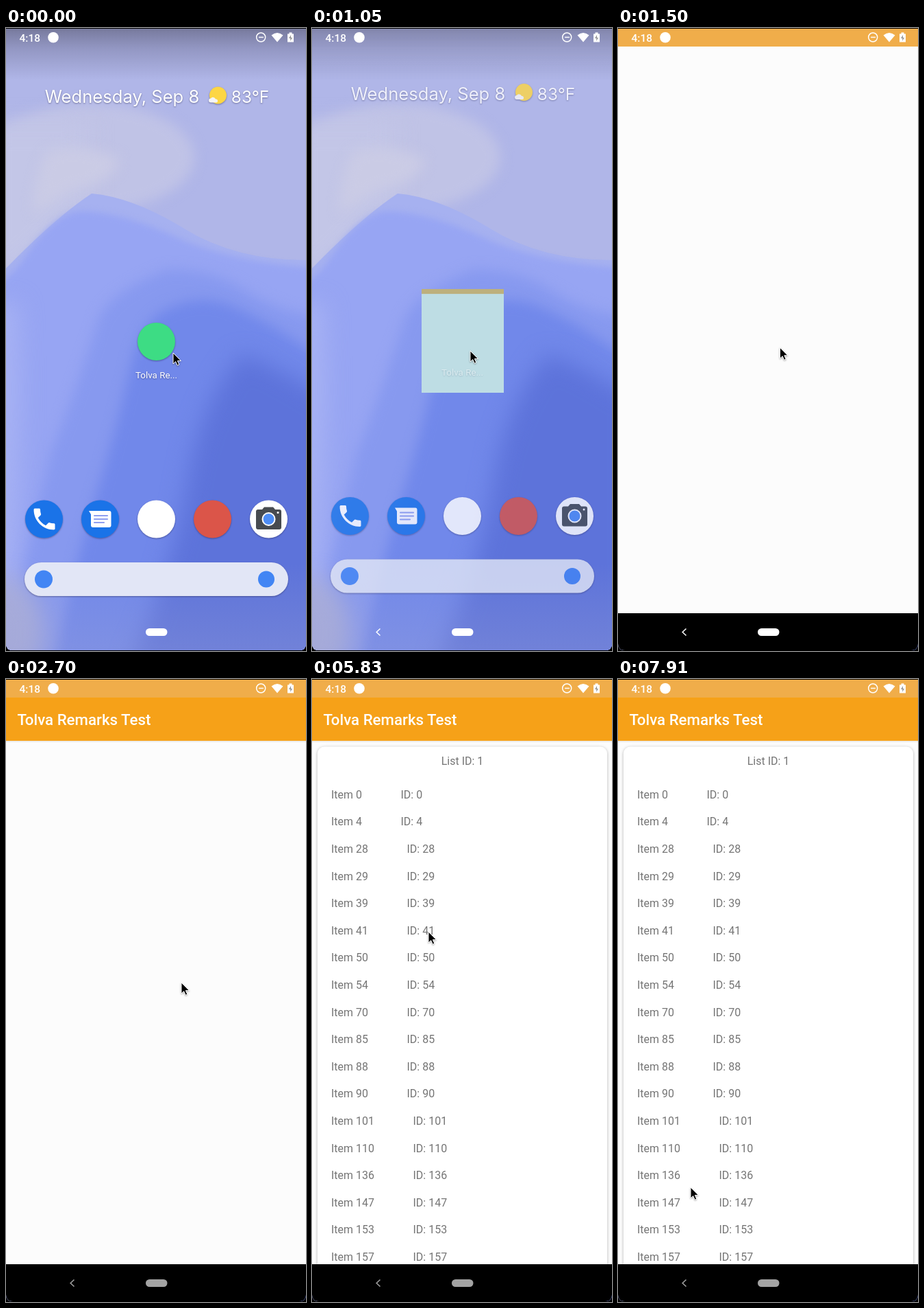
Recreate the animation shown at these times as an HTML page. Size 438 by 907 pixels, loop 8 s.

```html
<!DOCTYPE html>
<html lang="en">
<head>
<meta charset="utf-8">
<style>
html, body { margin: 0; height: 100%; overflow: hidden; background: #000; }
svg { display: block; width: 438px; height: 907px; font-family: Roboto, sans-serif; }
.date { font: 400 25.6px Inter, sans-serif; text-anchor: middle; }
.shade { filter: drop-shadow(0 1px 1px rgba(30, 30, 70, .45)); }
.soft { filter: blur(5px); }
.mist { filter: blur(9px); }
.haze { filter: blur(16px); }
#rows { font-size: 16px; fill: #757575; }
#card { fill: #fff; filter: drop-shadow(0 1px 2px rgba(0, 0, 0, .3)); }
#cursor { filter: drop-shadow(0 1px 1px rgba(0, 0, 0, .35)); }
</style>
</head>
<body>
<svg viewBox="0 0 438 907">
  <defs>
    <clipPath id="screen"><path d="M0 1H438V896Q438 906 428 906H10Q0 906 0 896Z"/></clipPath>
    <clipPath id="content"><rect y="90" width="438" height="762"/></clipPath>
    <linearGradient id="dim" x2="0" y2="1">
      <stop stop-color="#46465c" stop-opacity=".55"/>
      <stop offset=".4" stop-color="#50506e" stop-opacity=".3"/>
      <stop offset="1" stop-color="#50506e" stop-opacity="0"/>
    </linearGradient>
    <linearGradient id="glow" x2="0" y2="1">
      <stop stop-color="#a0a4d4" stop-opacity="0"/>
      <stop offset="1" stop-color="#a0a4d4" stop-opacity=".3"/>
    </linearGradient>
  </defs>
  <rect width="438" height="907"/>
  <g clip-path="url(#screen)">
    <g id="wallpaper">
      <rect width="438" height="907" fill="#b0b6e8"/>
      <ellipse class="mist" cx="125" cy="188" rx="150" ry="78" fill="#c0c3e6"/>
      <path class="haze" d="M-30 140H120V260L-30 400Z" fill="#c3c6e7"/>
      <path class="mist" d="M60 180Q110 165 165 190Q160 225 100 235L40 270Q40 220 60 180Z" fill="#cacbe5"/>
      <path d="M0 350Q72 276 125 241Q185 246 260 292T438 338V907H0Z" fill="#a6b1f0"/>
      <path class="soft" d="M-20 385L20 345Q70 268 110 267Q170 268 250 305T460 350V930H-20Z" fill="#97a5f3"/>
      <path class="haze" d="M-30 400H18Q30 600 0 930H-30Z" fill="#a6b1f3"/>
      <path class="mist" d="M0 930Q35 740 65 620Q105 520 135 425Q150 385 235 352Q300 350 350 382T460 420V930Z" fill="#8799ef"/>
      <path class="mist" d="M70 930Q95 800 130 685Q160 590 180 500Q195 430 230 412Q280 385 330 405T460 480V930Z" fill="#7188ea"/>
      <path class="haze" d="M180 930Q245 780 265 660Q285 540 345 475Q400 495 470 540V930Z" fill="#5d73da"/>
      <ellipse class="haze" cx="0" cy="880" rx="55" ry="80" fill="#a7acdb"/>
      <rect y="780" width="438" height="127" fill="url(#glow)"/>
    </g>
    <g id="home">
      <rect width="438" height="76" fill="url(#dim)"/>
      <g id="items">
        <g class="shade">
          <g class="date" fill="#fff">
            <text x="169.5" y="109">Wednesday, Sep 8</text>
            <text x="356.5" y="109" style="font-size:24.4px">83°F</text>
          </g>
          <circle cx="309.5" cy="98" r="12.5" fill="#fdd644"/>
          <path d="M299 108.500a3 3 0 0 1 0-6a4 4 0 0 1 7 1a2.500 2.500 0 0 1 1 5Z" fill="#f5f5f5"/>
        </g>
        <circle id="app" class="shade" cx="219.5" cy="456.5" r="27.5" fill="#3ddc84"/>
        <g class="shade">
          <circle cx="55.5" cy="715" r="27.5" fill="#1a73e8"/>
          <circle cx="137.5" cy="715" r="27.5" fill="#1a73e8"/>
          <circle cx="219.5" cy="715" r="27.5" fill="#fff"/>
          <circle cx="301.5" cy="715" r="27.5" fill="#db5549"/>
          <circle cx="383.5" cy="715" r="27.5" fill="#fff"/>
          <rect x="27" y="778" width="385" height="49" rx="24.5" fill="#e2e6f6"/>
        </g>
        <path transform="translate(35.4 694.4) scale(1.72)" fill="#fff" d="M6.6 10.8c1.4 2.8 3.8 5.1 6.6 6.6l2.2-2.2c.3-.3.7-.4 1-.2 1.1.4 2.3.6 3.6.6.6 0 1 .4 1 1V20c0 .6-.4 1-1 1C10.6 21 3 13.4 3 4c0-.6.4-1 1-1h3.5c.6 0 1 .4 1 1 0 1.3.2 2.5.6 3.6.1.3 0 .7-.2 1Z"/>
        <path d="M121 703H151Q153.5 703 153.5 706V724Q153.5 727 150.5 727H127Q124 727 124 724V708Z" fill="#fff"/>
        <path d="M129 710H148M129 715H148M129 720H143" stroke="#8f9ff0" stroke-width="2.2" stroke-linecap="round"/>
        <path d="M368 701H374L377 697.5H390L393 701H399Q402 701 402 704V727Q402 730 399 730H368Q365 730 365 727V704Q365 701 368 701Z" fill="#474b50"/>
        <circle cx="383.5" cy="715" r="9" fill="#4e8df5" stroke="#fff" stroke-width="2"/>
        <circle cx="397" cy="705.5" r="1.5" fill="#fff"/>
        <circle cx="55" cy="802.5" r="13" fill="#4285f4"/>
        <circle cx="380" cy="802.5" r="12" fill="#4285f4"/>
      </g>
    </g>
    <g id="window">
      <rect id="body"/>
      <rect id="bar"/>
      <rect id="nav"/>
    </g>
    <text id="label" class="shade" x="219.5" y="510" font-size="13.4" fill="#fff" text-anchor="middle">Tolva Re...</text>
    <g id="toolbar">
      <rect y="90" width="438" height="2" fill="#000" opacity=".06"/>
      <rect y="27" width="438" height="63" fill="#f6a118"/>
      <text x="16.5" y="67.3" font-size="22.3" font-weight="500" fill="#fff">Tolva Remarks Test</text>
    </g>
    <g id="list" clip-path="url(#content)">
      <rect id="card" x="8" y="98.5" width="423" height="800" rx="10"/>
      <g id="rows"><text x="219.5" y="125" text-anchor="middle">List ID: 1</text></g>
    </g>
    <g fill="#fff">
      <text x="19.5" y="19.6" font-size="15.5" font-weight="500">4:18</text>
      <circle cx="69" cy="13.7" r="7.8"/>
      <path d="M387.5 10.5Q396 3.5 404.5 10.5L396 20.5Z"/>
      <path d="M411 8.5H413.5V6.5H417.5V8.5H420V20.5H411Z"/>
      <path d="M416 10L413 15H415.2V19L418 14H416Z" fill="#999"/>
      <path d="M369 13.5H376M365.7 13.5a6.5 6.5 0 1 0 13 0a6.5 6.5 0 1 0-13 0" fill="none" stroke="#fff" stroke-width="1.5"/>
    </g>
    <g id="keys">
      <rect x="204" y="874" width="31.5" height="11" rx="5.5" fill="#fff"/>
      <path id="back" d="M99.5 874.5L94.2 879.5L99.5 884.5" fill="none" stroke="#fff" stroke-width="1.5"/>
    </g>
    <path id="cursor" d="M0 0V16L3.7 12.6L6.2 18.2L8.8 17.1L6.4 11.6H11.5Z" stroke="#fff"/>
  </g>
</svg>
<script>
const LOOP = 8000;
const $ = id => document.getElementById(id);
const set = (id, attrs) => {
  for (const k in attrs) $(id).setAttribute(k, attrs[k]);
};
const show = (id, on) => set(id, { opacity: +on });

// Keys are [time, ...values]; linear between them, held at both ends.
function track(keys, t) {
  const i = keys.findIndex(k => k[0] > t);
  if (i === 0) return keys[0].slice(1);
  if (i < 0) return keys[keys.length - 1].slice(1);
  const a = keys[i - 1], b = keys[i], p = (t - a[0]) / (b[0] - a[0]);
  return a.slice(1).map((v, j) => v + (b[j + 1] - v) * p);
}

const POINTER = [
  [150, 244, 473], [600, 231, 470], [1200, 231, 470], [2250, 250, 453],
  [2700, 256, 442], [3150, 262, 383], [3300, 262, 383], [3750, 240, 300],
  [4200, 182, 165], [4490, 171, 123], [4790, 230, 124], [4940, 230, 124],
  [5390, 137, 230], [5830, 170, 368], [6130, 172, 418], [6700, 195, 540],
  [7310, 213, 670], [7910, 106, 740]
];
// x, y, width, height, navigation bar height
const OPENING = [
  [1050, 160, 380, 120, 151, 0], [1200, 3, 11, 433, 884, 49], [1350, 0, 1, 438, 905, 54]
];
const HOME = [[900, 1, 0], [1050, .8, -4.5], [1200, 0, -9]];
const KEYS = [[2250, 1], [2700, .64]];

const ids = [0, 4, 28, 29, 39, 41, 50, 54, 70, 85, 88, 90, 101, 110, 136, 147, 153, 157];
$('rows').innerHTML += ids.map((id, i) => {
  const y = 173.8 + 39.6 * i;
  return `<text x="28" y="${y}">Item ${id}</text>` +
    `<text x="${120.5 + 9 * String(id).length}" y="${y}">ID: ${id}</text>`;
}).join('');

function tick(t) {
  const base = [7310, 5830, 4340, 0].find(b => t >= b);
  return base + Math.floor((t - base) / 150) * 150;
}

function draw(t) {
  const [x, y] = track(POINTER, t);
  set('cursor', { transform: `translate(${x} ${y})` });

  const [alpha, lift] = track(HOME, t);
  const opening = t >= 1050, opened = t >= 1200;
  show('home', alpha);
  set('items', { transform: `translate(0 ${lift})` });
  set('label', { transform: `translate(0 ${lift})`, opacity: opened ? 0 : opening ? .45 : 1 });
  show('app', !opening);

  const [wx, wy, w, h, nav] = track(OPENING, t);
  show('window', opening);
  set('body', { x: wx, y: wy, width: w, height: h, fill: opened ? '#fcfcfc' : '#bedde4' });
  set('bar', { x: wx, y: wy, width: w, height: 26 * w / 438, fill: opened ? '#f0ad4a' : '#bdb07d' });
  set('nav', { x: wx, y: wy + h - nav, width: w, height: nav });

  show('toolbar', t >= 1800);
  show('list', t >= 3000);
  show('back', opening);
  show('keys', track(KEYS, t)[0]);
}

function loop() {
  draw(tick(performance.now() % LOOP));
  requestAnimationFrame(loop);
}
loop();
</script>
</body>
</html>
```
